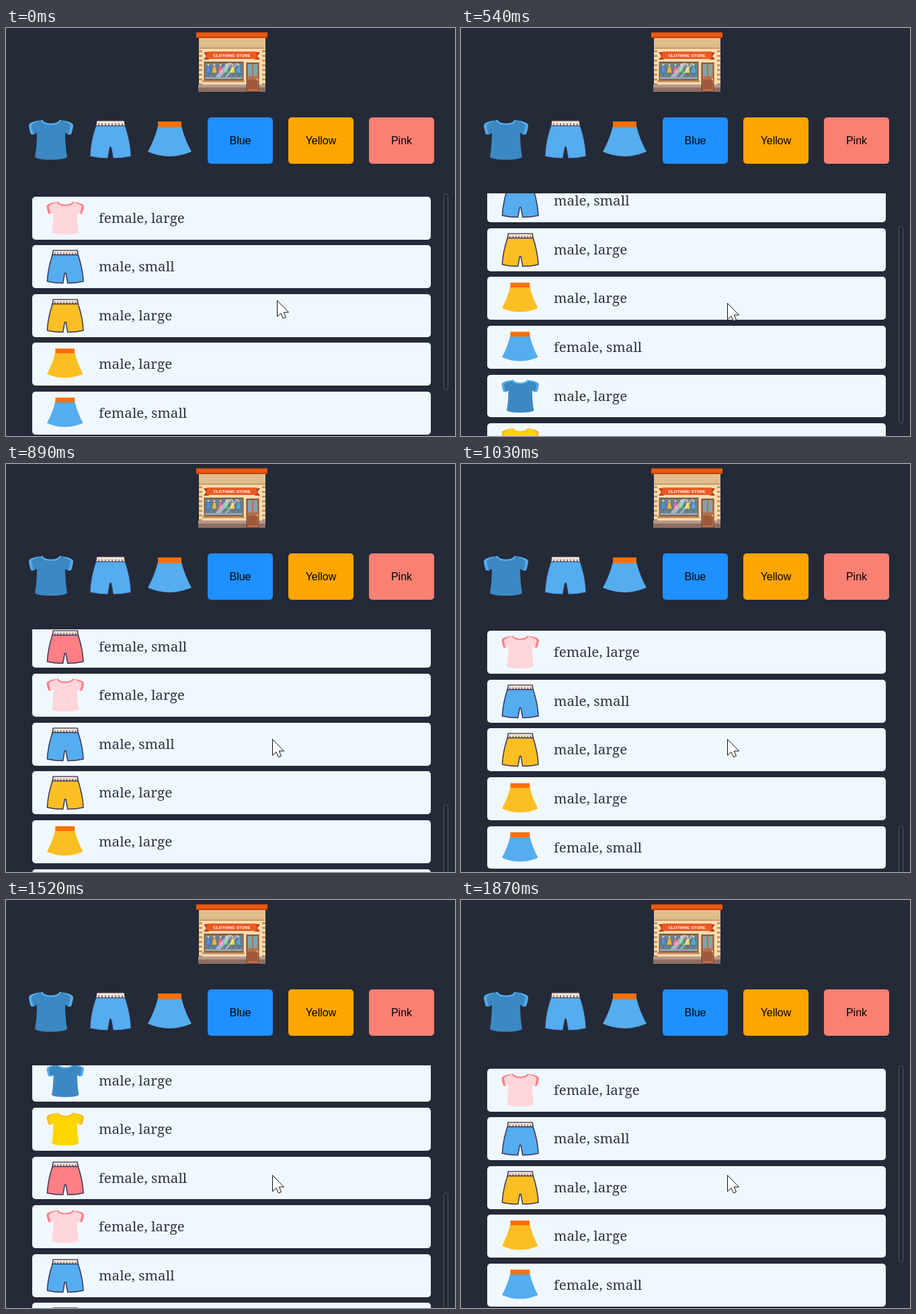
Animation of 668x607 px, one loop 1.94 s. Source, as an HTML page:

```html
<!DOCTYPE html>
<html lang="en">
<head>
<meta charset="utf-8">
<title>Clothing store</title>
<style>
  html, body { margin: 0; width: 100%; height: 100%; overflow: hidden; background: #242a37; }
  svg { display: block; }
  .label { font: 20.7px "Noto Serif", serif; fill: #30343f; }
  .button { font: 16px "Liberation Sans", Arial, sans-serif; text-anchor: middle; }
  .sign { font: bold 6.2px "Liberation Sans", Arial, sans-serif; fill: #fff; text-anchor: middle; }
</style>
</head>
<body>
<svg id="stage" width="668" height="607" viewBox="0 0 668 607"></svg>
<script>
const LOOP = 1940, STEP = 70;
const FIRST_ROW = 250.8, PITCH = 72.56, ROW_HEIGHT = 63.7;
const LIST_TOP = 246, THUMB_RATIO = 0.5;

// Scroll positions, one per step, from each start time on.
const scrolls = [
  { start: 400, path: [1, 28, 98, 183, 268, 353, 440, 519, 566, 583] },
  { start: 1380, path: [572, 488, 377, 280, 187, 103, 32, 0] }
];

const rect = (x, y, w, h, fill, more = "") =>
  `<rect x="${x}" y="${y}" width="${w}" height="${h}" fill="${fill}" ${more}/>`;
const path = (d, fill, more = "") => `<path d="${d}" fill="${fill}" ${more}/>`;
const place = (x, y, content, sx = 1, sy = sx) =>
  `<g transform="translate(${x} ${y}) scale(${sx} ${sy})">${content}</g>`;

const colors = {
  blue: { body: "#3b88c3", trim: "#55acee", cloth: "#55acee" },
  yellow: { body: "#ffd500", trim: "#fdb92e", cloth: "#fbbf24" },
  pink: { body: "#ffd6da", trim: "#ff8087", cloth: "#ff7f84" }
};

const icons = {
  shirt({ body, trim }) {
    const half = path("M20 1C10 2 2 4 0 8C0 13 2 19 3 22Q6 23 9 22L8 6Z", trim) +
      path("M19 2C12 4 6 5 4 9C5 14 6 19 7 22.500L12 20C12 33 11 45 9 56Q14 60 33.500 60V7C27 7 21 5 19 2Z", body);
    return half + place(66, 0, half, -1, 1) +
      path("M19 1C23 9 43 9 47 1", "none", `stroke="${trim}" stroke-width="2.6"`);
  },
  shorts({ cloth }, line) {
    let ticks = "";
    for (let x = 14; x < 52; x += 5) ticks += `M${x} 5V9`;
    const pen = `stroke="#3a3359" stroke-width="${line}" stroke-linejoin="round"`;
    return path("M10 8C6 20 2 33 1 54Q14 57 27.500 57L30.500 40H32.500L35.500 57Q49 57 62 54C61 33 57 20 53 8Z", cloth, pen) +
      path("M11 1H52L53 8.500H10Z", "#f8e3d0", pen) +
      path(ticks, "none", `stroke="#3a3359" stroke-width="1.2"`);
  },
  skirt({ cloth }) {
    return path("M15 8Q10 28 0 46Q32 60 65 46Q55 28 50 8Z", cloth) +
      rect(15, 1, 35, 8.5, "#ff6f00");
  }
};

function store() {
  const dresses = ["#4c8fe0", "#e8b53c", "#e272a0", "#58b984", "#f0d04a", "#58a7dc"];
  let s = rect(287, 14, 99, 78, "#f9dcae") + rect(287, 15, 99, 14, "#dfbd8d") +
    rect(283, 6.5, 106, 8, "#e8590f", 'rx="1"') + rect(283, 13, 106, 2, "#bd430b") +
    rect(287, 29, 99, 2, "#c99965");
  for (let y = 33; y < 84; y += 7)
    s += rect(287, y, 5, 3, "#c59663") + rect(381, y, 5, 3, "#c59663");
  s += path("M294 36H302V47H294L298 42ZM378 36H370V47H378L374 42Z", "#b93e12") +
    rect(299, 35, 74, 11, "#ed5b24") +
    '<text class="sign" x="336" y="43">CLOTHING STORE</text>' +
    rect(294.5, 50, 59, 28, "#8c5a3a") + rect(296, 52, 56, 24, "#6a8192");
  dresses.forEach((c, i) => {
    const x = 301 + i * 9;
    s += `<circle cx="${x}" cy="55" r="1.6" fill="#e7cdb5"/>` +
      path(`M${x - 2} 57h4l1 5l1 5h-8l1-5ZM${x} 67v6`, c, 'stroke="#48545f" stroke-width=".5"');
  });
  return s + path("M309 76L329 52H337L317 76ZM323 76L343 52H346L326 76Z", "#fff", 'opacity=".45"') +
    rect(296, 73, 56, 3, "#8fa5b2") + rect(292, 78, 63, 2.5, "#c58b5b") +
    rect(286, 84.5, 100, 10.5, "#8d6e63") + rect(286, 84.5, 100, 4, "#b59a8c") +
    rect(357.5, 51.5, 19, 43.5, "#7b452e") + rect(359, 53, 16.5, 41, "#b66e48") +
    rect(360, 54, 6, 18, "#7fa6ad") + rect(368, 54, 6, 18, "#7fa6ad") +
    rect(360, 77, 14, 14, "#9d5939") + rect(373, 75, 2, 3, "#f2c14e");
}

function button(x, text, fill) {
  return rect(x, 133, 97, 69, fill, 'rx="5"') +
    `<text class="button" x="${x + 48.5}" y="173">${text}</text>`;
}

const items = [
  ["shirt", "pink", "female, large"],
  ["shorts", "blue", "male, small"],
  ["shorts", "yellow", "male, large"],
  ["skirt", "yellow", "male, large"],
  ["skirt", "blue", "female, small"],
  ["shirt", "blue", "male, large"],
  ["shirt", "yellow", "male, large"],
  ["shorts", "pink", "female, small"]
];
const fits = { shirt: [60.5, 7, 0.84, 0.82], shorts: [60.5, 7, 0.88, 0.87], skirt: [61, 8, 0.825, 0.84] };

function row([kind, color, text]) {
  const [x, y, sx, sy] = fits[kind];
  return `<g class="row">${rect(39, 0, 593, 64, "#f0f8ff", 'rx="5"')}` +
    place(x, y, icons[kind](colors[color], 1.7), sx, sy) +
    `<text class="label" x="138" y="39">${text}</text></g>`;
}

const stage = document.getElementById("stage");
stage.innerHTML = store() +
  place(34, 136, icons.shirt(colors.blue)) +
  place(124, 137, icons.shorts(colors.blue, 0.9)) +
  place(211, 138, icons.skirt(colors.blue)) +
  button(300, "Blue", "#1e90ff") +
  button(420, "Yellow", "#ffa500") +
  button(540, "Pink", "#fa8072") +
  `<clipPath id="view">${rect(0, LIST_TOP, 668, 361, "#000")}</clipPath>` +
  `<g clip-path="url(#view)">${[...items, ...items].map(row).join("")}</g>` +
  rect(651.5, 0, 6, 292, "#222733", 'id="thumb" rx="3" stroke="#535964"') +
  path("M.5.5V24.500L6 19.500L9.500 27L13.500 25.300L10.300 18H17.500Z", "#fff",
    'id="cursor" stroke="#111" stroke-linejoin="round"');

const rows = stage.querySelectorAll(".row");
const thumb = document.getElementById("thumb");
const cursor = document.getElementById("cursor");

function scrollAt(t) {
  let pos = 0;
  for (const { start, path } of scrolls)
    if (t >= start) pos = path[Math.min(Math.floor((t - start) / STEP), path.length - 1)];
  return pos;
}

function draw(now) {
  const t = now % LOOP, pos = scrollAt(t);
  rows.forEach((el, i) => {
    const top = FIRST_ROW + i * PITCH - pos, y = Math.round(top);
    el.setAttribute("transform", `translate(0 ${y})`);
    el.firstChild.setAttribute("height", Math.round(top + ROW_HEIGHT) - y);
  });
  thumb.setAttribute("y", LIST_TOP + 0.5 + Math.round(pos * THUMB_RATIO));
  cursor.setAttribute("transform", t < STEP ? "translate(403 405)" : "translate(396 409)");
  requestAnimationFrame(draw);
}
draw(0);
</script>
</body>
</html>
```
